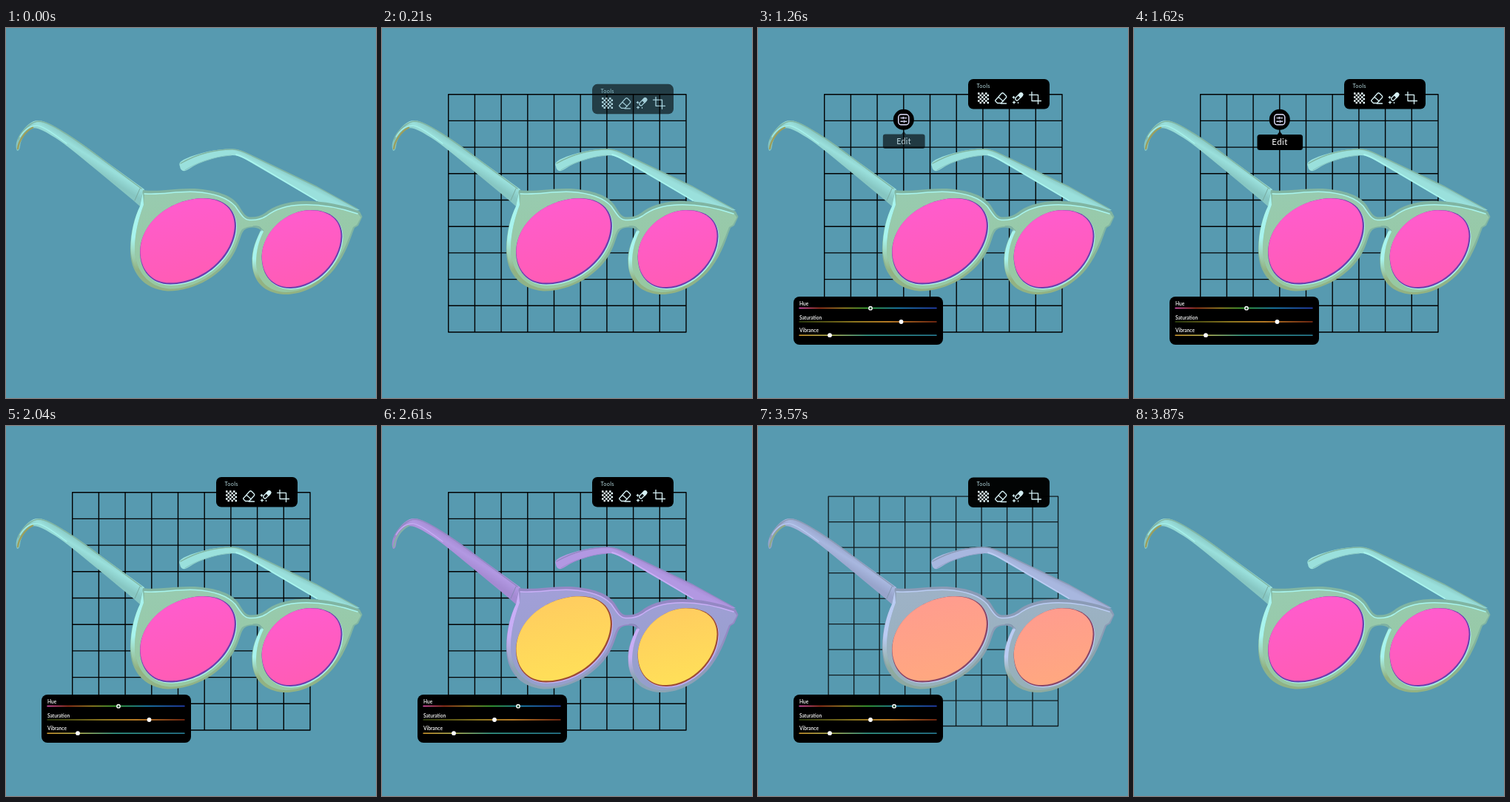
Recreate the animation shown at these times as an HTML page. Size 500 px wide and 500 px high, loop 4.35 s.

```html
<!DOCTYPE html>
<html lang="en">
<head>
<meta charset="utf-8">
<title>Sunglasses editor</title>
<style>
html, body { margin: 0; width: 100%; height: 100%; overflow: hidden; background: #579ab0; }
svg { display: block; width: 100vw; height: 100vh; }
text { font-family: Lato, "Open Sans", sans-serif; fill: #fff; }
.line { fill: none; stroke-linecap: round; stroke-linejoin: round; }
.label { font-size: 6.6px; font-weight: 600; }
.icons { stroke: #d6f0f4; stroke-width: 1.3; }
</style>
</head>
<body>
<svg id="stage" viewBox="0 0 500 500">
  <defs>
    <linearGradient id="lensFill" x1="0.4" y1="0" x2="0.6" y2="1">
      <stop offset="0" style="stop-color:var(--lensTop)"/>
      <stop offset="1" style="stop-color:var(--lensLow)"/>
    </linearGradient>
    <linearGradient id="armFill" gradientUnits="userSpaceOnUse" x1="98" y1="152" x2="86" y2="171">
      <stop offset="0" style="stop-color:var(--armLow)"/>
      <stop offset="0.45" style="stop-color:var(--arm)"/>
      <stop offset="1" style="stop-color:var(--armLow)"/>
    </linearGradient>
    <linearGradient id="farFill" gradientUnits="userSpaceOnUse" x1="370" y1="188" x2="361" y2="206">
      <stop offset="0" style="stop-color:var(--armLow)"/>
      <stop offset="0.4" style="stop-color:var(--arm)"/>
      <stop offset="1" style="stop-color:var(--arm)"/>
    </linearGradient>
    <linearGradient id="faceFill" x1="0" y1="0" x2="0.15" y2="1">
      <stop offset="0" style="stop-color:var(--faceTop)"/>
      <stop offset="1" style="stop-color:var(--face)"/>
    </linearGradient>
    <linearGradient id="rimFill" x1="0" y1="0" x2="0" y2="1">
      <stop offset="0" style="stop-color:var(--rimTop)"/>
      <stop offset="0.4" style="stop-color:var(--rimTop)"/>
      <stop offset="1" style="stop-color:var(--rimLow)"/>
    </linearGradient>
    <linearGradient id="sideFill" x1="0" y1="0" x2="0" y2="1">
      <stop offset="0" style="stop-color:var(--shine)"/>
      <stop offset="0.5" style="stop-color:var(--shine)"/>
      <stop offset="0.85" style="stop-color:var(--rimLow)"/>
    </linearGradient>
    <linearGradient id="hueFill" gradientUnits="userSpaceOnUse" x1="56" y1="0" x2="241" y2="0">
      <stop offset="0" stop-color="#f058c0"/><stop offset="0.15" stop-color="#b03a20"/>
      <stop offset="0.33" stop-color="#b09a28"/><stop offset="0.5" stop-color="#40c040"/>
      <stop offset="0.72" stop-color="#2098d0"/><stop offset="1" stop-color="#2848c8"/>
    </linearGradient>
    <linearGradient id="satFill" gradientUnits="userSpaceOnUse" x1="56" y1="0" x2="241" y2="0">
      <stop offset="0" stop-color="#34480f"/><stop offset="0.4" stop-color="#b89a28"/>
      <stop offset="0.65" stop-color="#f0a030"/><stop offset="1" stop-color="#8c3014"/>
    </linearGradient>
    <linearGradient id="vibFill" gradientUnits="userSpaceOnUse" x1="56" y1="0" x2="241" y2="0">
      <stop offset="0" stop-color="#d8a030"/><stop offset="0.25" stop-color="#b8c060"/>
      <stop offset="0.5" stop-color="#38a898"/><stop offset="1" stop-color="#2a86a0"/>
    </linearGradient>
  </defs>

  <rect width="500" height="500" fill="#579ab0"/>
  <path id="grid" class="line" stroke="#000" stroke-width="1.4"/>

  <g id="glasses">
    <!-- far arm -->
    <path d="M235 187C233 182 236 180 242 177C262 168 283 164 304 163.500C313 163 320 166 330 171L420 214L478 246L458 250L424 236L340 187C326 179 317 172 306 172C286 173 262 180 248 190C241 195 236 194 235 187Z" fill="url(#farFill)"/>
    <path class="line" d="M236 183C262 168 285 164 306 164C316 164 325 169 334 173.500L420 214.500L474 244" stroke="var(--rimTop)" stroke-width="1.400"/>
    <path class="line" d="M311 171C320 173 330 180 341 186L420 233" stroke="var(--shine)" stroke-width="1.800"/>
    <path class="line" d="M242 192C255 184 278 174 304 172" stroke="var(--armLow)" stroke-width="1.200"/>
    <!-- near arm -->
    <path d="M15 166C12 160 14 151 20 142C27 132 35 124 45 125C54 126 62 131 74 138C96 151 112 163 132 178L187 218L181 241L172 233L120 190C100 174 82 158 66 148C53 140 43 134 36 135.500C28 138 20 149 19 160C18.500 164 17 166 15 166Z" fill="url(#armFill)"/>
    <path class="line" d="M16 151C22 138 34 126 45 126C55 127 67 134 77 140.500C98 153 116 167 134 180.500L183 217" stroke="var(--rimTop)" stroke-width="1.500"/>
    <path class="line" d="M16 163C17 153 25 140 36 134.500" stroke="var(--tip)" stroke-width="2.400"/>
    <path class="line" d="M19 147C25 137 33 131.500 43 132C53 134 67 145 82 156" stroke="var(--shine)" stroke-width="1.200"/>
    <path class="line" d="M181 217L174 233" stroke="var(--edge)" stroke-width="1"/>
    <!-- rim, sides and face -->
    <path d="M185 219C207 222 227 216 255 217C284 219 305 226 314 239C320 248 322 254 329 255.500C337 256 344 254 350 250C361 241 378 235 398 234C423 233 455 238 478 248L481.500 255L476 267L471 270C465 285 460 304 445 324C428 346 402 361 375 360C350 358 334 344 332.500 318C331 299 339 285 344 273C340 269 329 268 322 273C317 278 316 289 310 301C294 334 254 356 218 355.500C186 353 167 330 168 298C168 275 174 255 181 241Z" fill="url(#rimFill)"/>
    <path d="M187 223C207 226 227 220 255 221C284 223 303 230 311 242C317 252 321 258.500 329 259C337 259.500 346 258 352 254C363 245 381 239 399 238.500C423 238 453 243 476 251L479.500 256L474 266L469 269C463 284 457 303 442 322C425 343 402 357 378 357C354 356 339 342 338 318C337 300 343 285 348 273C343 267 328 266 319 272C314 279 313 289 307 300C291 331 254 353 221 352.500C192 350 174 328 174 298C174 276 180 255 186 239Z" fill="url(#faceFill)"/>
    <path d="M185 222L186 239C180 255 174 276 174 298C174 319 183 337 199 346C179 339 169 320 168.500 298C168.500 276 174 255 181 241Z" fill="url(#sideFill)"/>
    <path d="M345 272L348 275C342 287 338 300 338 318C339 334 346 346 358 352C342 349 333.500 335 333 318C332 299 339 285 345 272Z" fill="url(#sideFill)"/>
    <path class="line" d="M187 224C212 226 230 220 256 221.500C280 223 299 229 310 241C317 251 321 259 329 259.500C337 260 345 258.500 352 254C365 244 382 239.500 399 239C423 238 451 243 475 251" stroke="var(--shine)" stroke-width="1.500"/>
    <path class="line" d="M345 274C345 268 340 267.500 334 268" stroke="var(--edge)" stroke-width="1.200"/>
    <g id="lenses"></g>
  </g>

  <g id="tools">
    <rect x="284" y="69" width="110" height="40.500" rx="7"/>
    <text x="295.500" y="81" font-size="7.200" letter-spacing="0.400" style="fill:#b9dde2">Tools</text>
    <path id="checks" fill="#e6f8fa"/>
    <g class="line icons">
      <path d="M321 97.500L329 88.500Q330.500 87 332 88.500L335 91.500Q336.500 93 335 94.500L328.500 101.500H323.500L320.800 98.800Q320.200 98.200 321 97.500ZM325 93.300L331.300 99M328 102H335.500"/>
      <path d="M348.500 94L354 88.300Q355.500 87 357 88.300Q358.500 90 357 91.700L351.500 97.300Q350 98.700 348.500 97.300Q346.900 95.700 348.500 94Z"/>
      <path d="M352 91L355 94L357 91.500Q358.500 90 357 88.400Q355.500 87 354 88.500Z" fill="#d6f0f4"/>
      <path d="M345.500 92.500V95M344.200 93.700H346.800M346 99V102M344.500 100.500H347.500M351.500 100.500V101.500"/>
      <path d="M370 86.500V98.500H382.500M366.500 90.300H378.500V102.500"/>
    </g>
  </g>

  <g id="sliders">
    <rect x="48" y="363" width="202" height="65" rx="8"/>
    <text class="label" x="56" y="375.300">Hue</text>
    <text class="label" x="56" y="393.700">Saturation</text>
    <text class="label" x="56" y="411.300">Vibrance</text>
    <g class="line" stroke-width="1.500">
      <path d="M56 378.500H241" stroke="url(#hueFill)"/>
      <path d="M56 397H241" stroke="url(#satFill)"/>
      <path d="M56 415.200H241" stroke="url(#vibFill)"/>
    </g>
    <circle id="hueKnob" cy="378.700" r="2.200" fill="#164a2c" stroke="#fff" stroke-width="1.400"/>
    <circle id="satKnob" cy="397" r="2.900" fill="#fff"/>
    <circle cx="97" cy="415.200" r="2.900" fill="#fff"/>
  </g>

  <g id="edit">
    <circle id="disc" cx="196.800" cy="123.800"/>
    <g id="glyph" class="line" stroke-width="1.800">
      <rect x="-8.800" y="-8.800" width="17.600" height="17.600" rx="4.800"/>
      <path d="M-4.800 -2.800H-2.500M1 -2.800H4.800M-4.800 3H-1M2.500 3H4.800" stroke-width="1.700"/>
      <path d="M-0.800 -4V-1.600M0.800 1.800V4.200" stroke-width="2"/>
    </g>
  </g>
  <g id="tip">
    <path d="M193 145L197 139.500L201 145Z"/>
    <rect x="166.500" y="144" width="61.500" height="21" rx="3.500"/>
    <text x="197" y="158.200" font-size="11.500" letter-spacing="0.400" text-anchor="middle">Edit</text>
  </g>
</svg>
<script>
const LOOP = 4350, STEP = 30;
const $ = id => document.getElementById(id);
const stage = $('stage');

// each entry: mint look, lilac look
const colors = {
  lensTop: ['#ff5cce', '#ffcc60'],
  lensLow: ['#ff5cb4', '#ffe058'],
  lensRim: ['#6a3fae', '#9c4c34'],
  face: ['#97c8a2', '#959fcb'],
  faceTop: ['#98cbb0', '#a29fd8'],
  arm: ['#9ae0dc', '#b298e2'],
  armLow: ['#86c6c2', '#a48ad2'],
  shine: ['#a8f4ee', '#c8aef6'],
  rimTop: ['#80b5a2', '#9488c4'],
  rimLow: ['#93b281', '#8ba5b4'],
  tip: ['#9c9f5c', '#86b0a8'],
  edge: ['#78aaa0', '#8586b6']
};

const clamp = x => Math.min(1, Math.max(0, x));
const span = (t, start, length) => clamp((t - start) / length);
const easeIn = p => p ** 3;
const easeOut = p => 1 - (1 - p) ** 3;
const easeBoth = p => p < 0.5 ? 4 * p ** 3 : 1 - 4 * (1 - p) ** 3;
const lerp = (a, b, p) => a + (b - a) * p;

// rise with easeOut, later fall with easeIn
const visit = (t, inAt, inLen, outAt, outLen) =>
  easeOut(span(t, inAt, inLen)) * (1 - easeIn(span(t, outAt, outLen)));

const channels = hex => [1, 3, 5].map(i => parseInt(hex.slice(i, i + 2), 16));
function mix(a, b, p) {
  const to = channels(b);
  return `rgb(${channels(a).map((v, i) => Math.round(lerp(v, to[i], p)))})`;
}

function place(el, opacity, transform) {
  el.setAttribute('opacity', opacity);
  el.setAttribute('transform', transform);
  el.style.display = opacity > 0.001 ? '' : 'none';
}

const about = (x, y, s) => `translate(${x} ${y}) scale(${s}) translate(${-x} ${-y})`;

// lit lip below, dark inner rim, then the tinted glass set toward the upper left
const lens = (d, x, y) =>
  `<path d="${d}" transform="translate(1 1.2)" fill="var(--shine)"/>` +
  `<path d="${d}" fill="var(--lensRim)"/>` +
  `<path d="${d}" transform="${about(x, y, 0.98)}" fill="url(#lensFill)"/>`;

function build() {
  let lines = '', cells = '';
  for (let i = 0; i < 10; i++) {
    const p = 89.7 + i * 35.7;
    lines += `M${p} 89.7V411M89.7 ${p}H411`;
  }
  $('grid').setAttribute('d', lines);

  for (let i = 0; i < 36; i++) {
    const col = i % 6, row = Math.floor(i / 6);
    if ((col + row) % 2 === 0) cells += `M${297 + col * 2.5} ${87.2 + row * 2.5}h2.5v2.5h-2.5z`;
  }
  $('checks').setAttribute('d', cells);

  $('lenses').innerHTML =
    lens('M181 302C182 262 224 230 268 230C294 230 311 244 311 268C310 306 271 346 222 346.500C196 346.500 181 328 181 302Z', 200, 240) +
    lens('M345.500 308C347.500 274 380 246 412 246C438 246 454.500 259 454.500 282C453.500 317 420 351 385 352C361 352.500 345.500 336 345.500 308Z', 355, 255);
}

function draw(t) {
  const slide = easeBoth(span(t, 2160, 450));
  const tint = slide * (1 - easeBoth(span(t, 3390, 380)));
  for (const name in colors) stage.style.setProperty('--' + name, mix(...colors[name], tint));

  const grid = visit(t, 15, 215, 3390, 325);
  place($('grid'), grid, about(250.35, 250.35, lerp(0.8, 1, grid)));

  const tools = visit(t, 150, 230, 3500, 230);
  place($('tools'), tools, `translate(0 ${17 * (1 - tools)})`);

  const panel = visit(t, 270, 250, 3600, 260);
  place($('sliders'), panel, `translate(0 ${17 * (1 - panel)})`);
  $('hueKnob').setAttribute('cx', lerp(152, 184, slide));
  $('satKnob').setAttribute('cx', lerp(193.5, 152, slide));

  const icon = visit(t, 360, 210, 1830, 210);
  place($('edit'), icon, about(196.8, 123.8, lerp(0.7, 1, icon)));

  const hover = easeBoth(span(t, 870, 360));
  $('disc').setAttribute('r', 14 * hover);
  $('glyph').setAttribute('transform', `translate(196.8 123.8) scale(${lerp(1, 0.8, hover)})`);
  $('glyph').setAttribute('stroke', mix('#ffffff', '#dcdcfa', hover));

  const tip = visit(t, 1170, 330, 1680, 240);
  place($('tip'), tip, about(197, 139, lerp(0.8, 1, tip)));
}

build();
draw(0);
const begin = performance.now();
function tick(now) {
  const t = Math.max(0, now - begin) % LOOP;
  draw(Math.floor(t / STEP) * STEP);
  requestAnimationFrame(tick);
}
requestAnimationFrame(tick);
</script>
</body>
</html>
```
